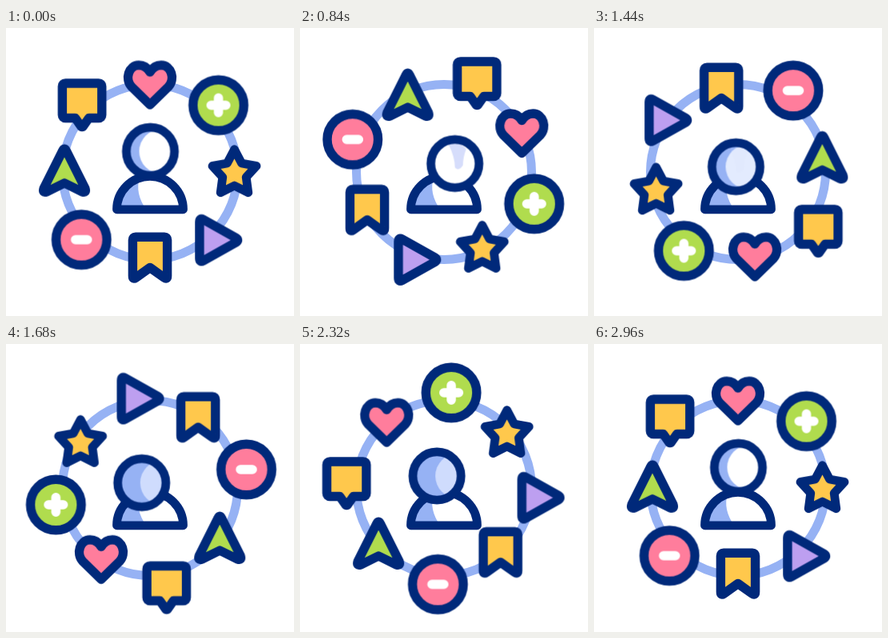
These frames come from a looping animation (360x360 px, 3 s). An HTML page:

```html
<!DOCTYPE html>
<html lang="en">
<head>
<meta charset="utf-8">
<title>User activity</title>
<style>
  :root {
    --navy: #00297a; --blue: #96b2f4; --pale: #cfdcfd;
    --pink: #ff7d9c; --yellow: #ffc84c; --green: #b0dc4e; --purple: #bd9ff0;
  }
  html, body { margin: 0; width: 100%; height: 100%; overflow: hidden; background: #fff; }
  svg { display: block; width: 100vw; height: 100vh; }

  .line { stroke: var(--navy); stroke-width: 11.4; stroke-linecap: round; stroke-linejoin: round; }
  .thin { stroke-width: 10.8; }
  .sign { fill: none; stroke: #fff; stroke-width: 11.5; stroke-linecap: round; }
  .pink { fill: var(--pink); }
  .yellow { fill: var(--yellow); }
  .green { fill: var(--green); }
  .purple { fill: var(--purple); }

  /* Every part shares one 3 s loop with a short rest at both ends. */
  .spin, .upright, .sway, .dip, .light, .glint {
    animation: 3s cubic-bezier(.333, 0, .667, 1) infinite;
    transform-origin: 0 0;
  }
  .spin { animation-name: spin; }
  .upright { animation-name: upright; }
  .sway { animation-name: sway; }
  .dip { animation-name: dip; }
  .light { animation-name: light; }
  .glint { animation-name: glint; }

  @keyframes spin {
    0%, 2.667% { transform: rotate(0deg); }
    97.333%, 100% { transform: rotate(360deg); }
  }
  @keyframes upright {
    0%, 2.667% { transform: rotate(0deg); }
    97.333%, 100% { transform: rotate(-360deg); }
  }
  @keyframes sway {
    0%, 2.667%, 97.333%, 100% { transform: translateX(0); }
    28.67% { transform: translateX(13.2px); }
    62%, 66.67% { transform: translateX(-13px); }
  }
  @keyframes dip {
    0%, 2.667%, 97.333%, 100% { transform: translateY(0); }
    38.67%, 60% { transform: translateY(19.2px); }
  }
  @keyframes light {
    0%, 10.67%, 97.333%, 100% { transform: translateX(14px); fill: #fff; }
    26%, 40% { transform: translateX(0); fill: #fff; }
    54.5%, 78% { transform: translateX(26px); fill: var(--pale); }
  }
  @keyframes glint {
    0%, 16%, 50%, 100% { opacity: 0; }
    26%, 40% { opacity: 1; }
  }
</style>
</head>
<body>
<svg viewBox="0 0 360 360">
  <clipPath id="face"><circle r="30"/></clipPath>

  <g transform="translate(180 180)">
    <circle r="109.5" fill="none" stroke="#96b2f4" stroke-width="11"/>

    <!-- Icons circle the ring and stay upright. -->
    <g class="spin">
      <g transform="translate(0 -108.5)">
        <path class="upright line pink" d="M0 24.5L-23 2C-32 -8 -26.5 -25 -14 -25C-8 -25 -3 -21.5 0 -16.5C3 -21.5 8 -25 14 -25C26.5 -25 32 -8 23 2Z"/>
      </g>
      <g transform="rotate(45.7) translate(0 -119.5) rotate(-45.7)">
        <g class="upright">
          <circle class="line green" r="31.8"/>
          <path class="sign" d="M-9.3 0H9.3M0 -9.3V9.3"/>
        </g>
      </g>
      <g transform="rotate(89.5) translate(0 -105) rotate(-89.5)">
        <path class="upright line thin yellow" d="M.5 -27.3L9.6 -10L28 -6.6L15.2 7.3L17.8 26.6L.5 18L-16.8 26.6L-14.2 7.3L-27 -6.6L-8.6 -10Z"/>
      </g>
      <g transform="rotate(136.5) translate(0 -115) rotate(-136.5)">
        <path class="upright line purple" d="M-17.2 -21Q-17.2 -26.5 -12.5 -24L28 -1.3Q33 1.7 28 4.8L-12.5 27.5Q-17.2 30 -17.2 24.5Z"/>
      </g>
      <g transform="rotate(180) translate(0 -107) rotate(-180)">
        <path class="upright line yellow" d="M-18 -25.7H18Q21.6 -25.7 21.6 -22V23Q21.6 28 17.5 25L0 12.5L-17.5 25Q-21.6 28 -21.6 23V-22Q-21.6 -25.7 -18 -25.7Z"/>
      </g>
      <g transform="rotate(225.3) translate(0 -121.7) rotate(-225.3)">
        <g class="upright">
          <g transform="translate(.8 -1)">
            <circle class="line pink" r="31.8"/>
            <path class="sign" d="M-7.5 0H7.5"/>
          </g>
        </g>
      </g>
      <g transform="rotate(271.2) translate(0 -107) rotate(-271.2)">
        <path class="upright line green" d="M-2.5 -24Q0 -29.5 2.5 -24L25.8 22.5Q28 29 22 26.8L0 16L-22 26.8Q-28 29 -25.8 22.5Z"/>
      </g>
      <g transform="rotate(316) translate(0 -122.2) rotate(-316)">
        <path class="upright line yellow" d="M-20.7 -23H20.7Q24.7 -23 24.7 -19V16.5Q24.7 20.5 20.7 20.5H8.5L1.5 30.5Q0 32.5 -1.5 30.5L-8.5 20.5H-20.7Q-24.7 20.5 -24.7 16.5V-19Q-24.7 -23 -20.7 -23Z"/>
      </g>
    </g>
  </g>

  <!-- Person -->
  <path fill="#fff" d="M138.5 226.8A41.5 41.5 0 0 1 221.5 226.8Z"/>
  <path fill="#96b2f4" d="M138.5 226.8A41.5 41.5 0 0 1 167 187.5Q161 206 175 226.8Z"/>
  <path class="line thin" fill="none" d="M138.5 226.8A41.5 41.5 0 0 1 221.5 226.8Z"/>
  <g transform="translate(180.5 154.3)">
    <g class="sway">
      <g class="dip">
        <circle r="30" fill="#96b2f4"/>
        <g clip-path="url(#face)">
          <circle class="light" r="28"/>
          <path class="glint" fill="#d6ddfb" d="M-8 -24Q6 -28 14 -18Q10 -8 10 2Q5 10 0 5Q0 -8 -8 -24Z"/>
        </g>
        <circle class="line thin" r="30.1" fill="none"/>
      </g>
    </g>
  </g>
</svg>
</body>
</html>
```
